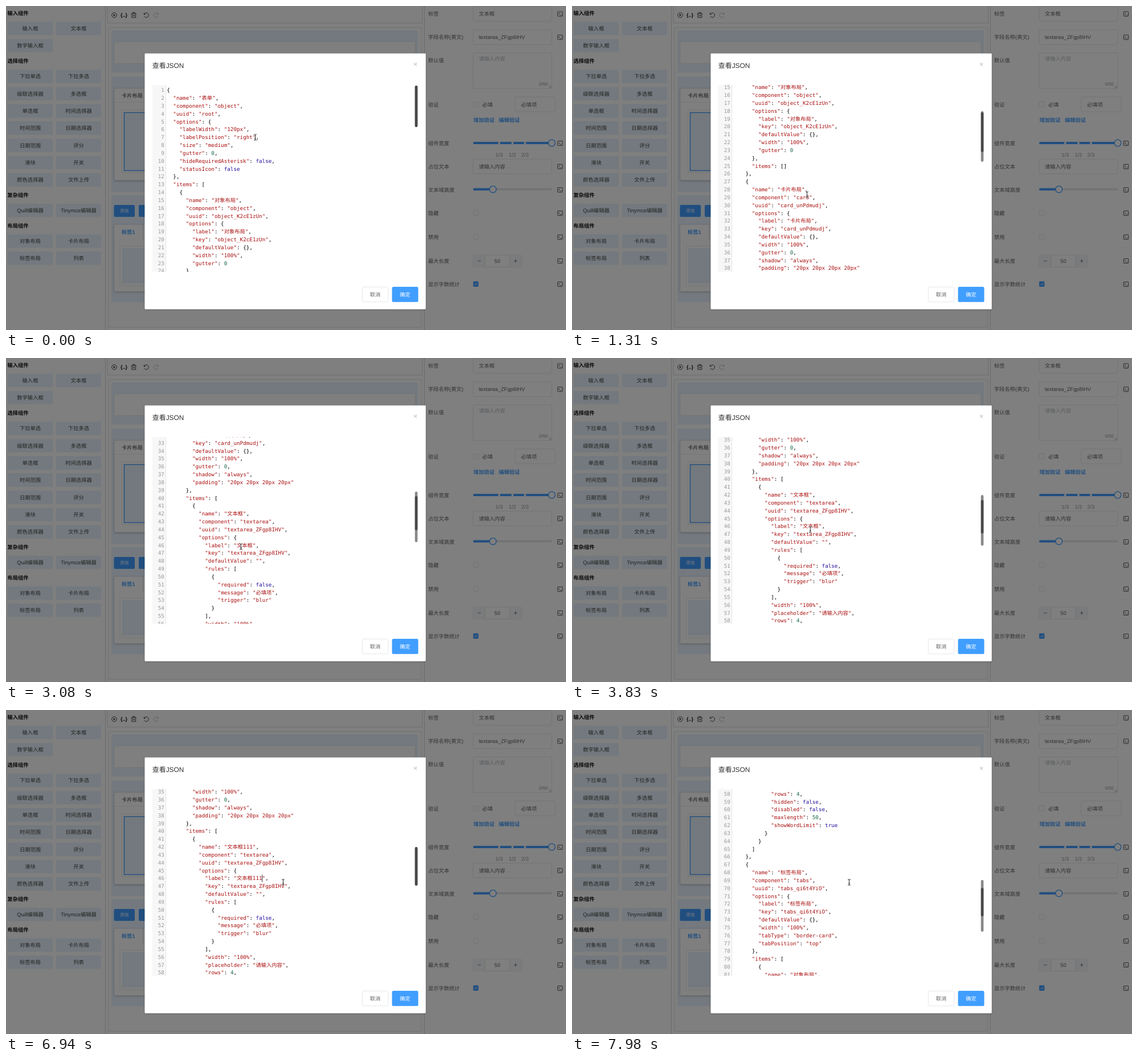
Animation of 983x570 px, one loop 8 s. Source, as an HTML page:

```html
<!DOCTYPE html>
<html lang="zh-CN">
<head>
<meta charset="utf-8">
<title>查看JSON</title>
<style>
  html, body { margin: 0; width: 100%; height: 100%; overflow: hidden; background: #fff; }
  svg { display: block; }
  text { font: 9.28px "Liberation Sans", "Noto Sans CJK SC", "Noto Sans CJK", sans-serif; text-rendering: geometricPrecision; white-space: pre; }
  .code text { font-family: "DejaVu Sans Mono", "Noto Sans CJK SC", "Noto Sans CJK", monospace; }
  .num { fill: #999; text-anchor: end; }
  .string { fill: #a11; } .number { fill: #164; } .atom { fill: #219; }
</style>
</head>
<body>
<svg id="stage" width="983" height="570" viewBox="0 0 983 570"></svg>
<script>
const BLUE = '#409eff', BORDER = '#dcdfe6', TEXT = '#606266', PALE = '#e8f3fd';
const SIZE = 9.28, CHAR = SIZE * 0.602, LINE = 13.83, CODE_X = 282.2, CODE_Y = 148;

// Drawing helpers; text is placed by its vertical centre.
const rect = (x, y, w, h, fill = '#fff', stroke = 'none', more = '') =>
  `<rect x="${x}" y="${y}" width="${w}" height="${h}" fill="${fill}" stroke="${stroke}" stroke-width=".7" ${more}/>`;
const path = (d, stroke, width = 1, more = '') =>
  `<path d="${d}" fill="none" stroke="${stroke}" stroke-width="${width}" ${more}/>`;
const circle = (x, y, r, fill, stroke = 'none', width = 1) =>
  `<circle cx="${x}" cy="${y}" r="${r}" fill="${fill}" stroke="${stroke}" stroke-width="${width}"/>`;
const label = (x, y, value, { fill = TEXT, size = SIZE, weight = 400, anchor = 'start' } = {}) =>
  `<text x="${x}" y="${y + size * 0.37}" fill="${fill}" text-anchor="${anchor}" style="font-size:${size}px;font-weight:${weight}">${value}</text>`;
const middle = { anchor: 'middle' };
const field = (x, y, w, h) => rect(x, y, w, h, '#fff', BORDER, 'rx="2.6"');

function sidebar() {
  const sections = [
    [12.5, '输入组件', '输入框 文本框 数字输入框'],
    [97, '选择组件', '下拉单选 下拉多选 级联选择器 多选框 单选框 时间选择器 时间范围 日期选择器 日期范围 评分 滑块 开关 颜色选择器 文件上传'],
    [332.5, '复杂组件', 'Quill编辑器 Tinymce编辑器'],
    [386.5, '布局组件', '对象布局 卡片布局 标签布局 列表'],
  ];
  return sections.map(([top, title, names]) =>
    label(2.5, top, title, { fill: '#111', weight: 600 }) +
    names.split(' ').map((name, i) => {
      const x = 3 + (i % 2) * 85, y = top + 27 + Math.floor(i / 2) * 30.3;
      return rect(x, y - 11.8, 79, 23.6, PALE, 'none', 'rx="1.5"') + label(x + 39.5, y, name, { ...middle, fill: '#444' });
    }).join('')).join('');
}

function toolbar() {
  const ink = '#333';
  return rect(178, -2, 552.5, 32, '#fff', '#ccc') +
    circle(190, 16, 4.3, 'none', ink, 0.9) + `<path d="M188.8 13.8l3.2 2.2-3.2 2.2z" fill="${ink}"/>` +
    label(207, 15.5, '{..}', { ...middle, fill: '#111', weight: 700, size: 9 }) +
    path('M219.8 13.3h9M222.5 13v-1.6h3.6V13M220.9 13.5v6.7h6.8v-6.7M223.2 15.3v3M225.4 15.3v3', ink, 0.9) +
    path('M242.3 12v2.8h2.8M242.6 14.5a4 4 0 1 1 .2 3.6', ink, 0.9) +
    path('M267 12v2.8h-2.8M266.7 14.5a4 4 0 1 0-.2 3.6', '#bbb', 0.9);
}

function canvasArea() {
  const dashed = 'stroke-dasharray="2 1.4"';
  return rect(180, 38, 549, 527, '#fff', '#d5dbe2') +
    rect(185, 43, 538, 74, PALE) + rect(190, 63, 528, 38, '#fff', '#cfd6dd', dashed) +
    rect(185, 124, 538, 203, PALE) +
    rect(190, 145, 528, 161.5, '#fff', '#d4d8df', 'rx="2.6" filter="url(#soft)"') +
    path('M190 169.5H718', '#e4e7ed', 0.7) + label(203, 157.5, '卡片布局', { fill: '#303133' }) +
    rect(203.5, 183, 500, 110, '#fff', '#ccc', dashed) + rect(207.5, 187.5, 490, 102, PALE, BLUE, 'style="stroke-width:1.4"') +
    rect(185, 333, 538, 188, PALE) +
    rect(189.5, 350, 36.5, 21, BLUE, 'none', 'rx="2"') + label(207.7, 360.5, '添加', { ...middle, fill: '#fff', size: 8, weight: 500 }) +
    rect(233, 350, 36.5, 21, BLUE, 'none', 'rx="2"') +
    rect(190, 385, 528, 117, '#fff', BORDER, 'filter="url(#soft)"') + rect(190, 385, 528, 26, '#f5f7fa', BORDER) +
    rect(190, 385, 50, 26.5, '#fff') + path('M240 385v26', BORDER, 0.7) +
    label(203, 398, '标签1', { fill: BLUE, weight: 600 }) +
    rect(200, 422, 508, 70, '#fff', '#ccc', dashed) + rect(204, 426, 500, 62, PALE);
}

function properties() {
  const rows = { 14: '标签', 55: '字段名称(英文)', 95.5: '默认值', 173.5: '验证', 241.5: '组件宽度', 282.5: '占位文本',
    323.5: '文本域高度', 364.5: '隐藏', 406.5: '禁用', 448.5: '最大长度', 489.5: '显示字数统计' };
  const terminal = y => rect(968.3, y - 4, 8.4, 8, 'none', '#444', 'rx=".8" style="stroke-width:.9"') +
    path(`M970 ${y - 2}l2 1.8-2 1.8M972.7 ${y + 2}h2.4`, '#444', 0.8);
  const box = y => rect(820.4, y - 4.3, 8.6, 8.6, '#fff', BORDER, 'rx="1.2"');
  const handle = (x, y) => circle(x, y, 5.9, '#fff', BLUE, 1.3);
  const link = { fill: BLUE, weight: 700 };
  return Object.entries(rows).map(([y, name]) => label(741, +y, name)).join('') +
    [14, 55, 241.5, 282.5, 323.5, 364.5, 406.5, 448.5, 489.5].map(terminal).join('') +
    field(820, 0.7, 138, 26.2) + label(830, 14, '文本框') +
    field(820, 41.7, 138, 26.2) + label(830, 55, 'textarea_ZFgp8IHV') +
    field(820, 82.5, 138, 63) + label(830, 93, '请输入内容', { fill: '#b4b8bf' }) +
    label(951, 137.5, '0/50', { fill: '#909399', size: 7.95, anchor: 'end' }) + path('M952.5 144.5l4.5-4.5M955 144.5l2-2', '#888', 0.7) +
    box(173) + label(836, 173.5, '必填', { weight: 500 }) + field(893.5, 160, 70.5, 26) + label(904, 173.5, '必填项') +
    label(820.5, 201, '增加验证', link) + label(865, 201, '编辑验证', link) +
    rect(820, 239, 138, 4, BLUE, 'none', 'rx="2"') +
    [['1/3', 865.7], ['1/2', 889], ['2/3', 911]].map(([name, x]) =>
      circle(x, 241, 2, '#fff') + label(x, 262, name, { ...middle, fill: '#909399' })).join('') +
    handle(958, 241) +
    field(820, 269.2, 138, 26.2) + label(830, 282.5, '请输入内容') +
    rect(820, 320.5, 138, 4, '#e4e7ed', 'none', 'rx="2"') + rect(820, 320.5, 35, 4, BLUE, 'none', 'rx="2"') + handle(854.7, 322.5) +
    box(364) + box(406.3) +
    field(820, 438, 85, 21) + rect(820.4, 438.4, 20.6, 20.2, '#f5f7fa') + rect(884, 438.4, 20.6, 20.2, '#f5f7fa') +
    path('M841 438v21M884 438v21', BORDER, 0.7) + path('M828 448.5h5.5M891.5 448.5h6M894.5 445.5v6', TEXT, 0.8) +
    label(862.5, 448.5, '50', middle) +
    rect(820.4, 484.8, 8.6, 8.6, BLUE, BLUE, 'rx="1.2"') + path('M822.4 489.2l1.8 1.8 3-3.8', '#fff', 1);
}

function modal() {
  return rect(243.5, 83.5, 493.3, 450, '#fff', 'none', 'rx="1.4" filter="url(#soft)"') +
    label(256.8, 104.3, '查看JSON', { fill: '#303133', size: 11.93 }) +
    path('M716.2 100l5 5M721.2 100l-5 5', '#909399', 0.8) +
    field(625.4, 494.4, 45.4, 26.2) + label(648, 507.6, '取消', { ...middle, weight: 500 }) +
    rect(677.6, 494, 46, 26.8, BLUE, 'none', 'rx="2.6"') + label(700.6, 507.6, '确定', { ...middle, fill: '#fff', weight: 500 });
}

// The JSON shown in the editor.
const base = key => ({ key, defaultValue: {}, width: '100%' });
const node = (name, component, uuid, options, items) => ({ name, component, uuid, options, items });
const objectNode = uuid => node('对象布局', 'object', uuid, { label: '对象布局', ...base(uuid), gutter: 0 }, []);
const textarea = node('文本框', 'textarea', 'textarea_ZFgp8IHV', {
  label: '文本框', key: 'textarea_ZFgp8IHV', defaultValue: '',
  rules: [{ required: false, message: '必填项', trigger: 'blur' }],
  width: '100%', placeholder: '请输入内容', rows: 4, hidden: false, disabled: false, maxlength: 50, showWordLimit: true,
});
const form = node('表单', 'object', 'root',
  { labelWidth: '120px', labelPosition: 'right', size: 'medium', gutter: 0, hideRequiredAsterisk: false, statusIcon: false }, [
    objectNode('object_K2cE1zUn'),
    node('卡片布局', 'card', 'card_unPdmudj',
      { label: '卡片布局', ...base('card_unPdmudj'), gutter: 0, shadow: 'always', padding: '20px 20px 20px 20px' }, [textarea]),
    node('标签布局', 'tabs', 'tabs_qi6t4YiO',
      { label: '标签布局', ...base('tabs_qi6t4YiO'), tabType: 'border-card', tabPosition: 'top' }, [objectNode('object_Rw3mA8dL')]),
  ]);
const lines = JSON.stringify(form, null, 2).split('\n');

const highlight = line => line.trim().replace(/("[^"]*")|(\d+)|(true|false)/g, (token, string, number) =>
  `<tspan class="${string ? 'string' : number ? 'number' : 'atom'}">${token}</tspan>`);
const lineY = i => CODE_Y + i * LINE;
const codeLines = lines.map((line, i) => {
  const x = CODE_X + line.search(/\S/) * CHAR, y = lineY(i) + 3.3;
  return `<text class="num" x="277.8" y="${y}">${i + 1}</text><text class="line" x="${x}" y="${y}">${highlight(line)}</text>`;
}).join('');

const ibeam = 'M-2.3-5.3Q0-5.3 0-3.8Q0-5.3 2.3-5.3M0-4V4M-2.3 5.3Q0 5.3 0 3.8Q0 5.3 2.3 5.3M-1.2 2h2.4';
const stage = document.getElementById('stage');
stage.innerHTML = `<defs>
  <filter id="soft" x="-5%" y="-5%" width="110%" height="115%"><feDropShadow dx="0" dy="1" stdDeviation="1.7" flood-opacity=".25"/></filter>
  <clipPath id="view"><rect x="257" y="139" width="467" height="328.7"/></clipPath></defs>
  ${rect(0, 0, 983, 570)}${path('M174.5 0V570M734.5 0V570', '#ccc', 0.8)}
  ${sidebar()}${toolbar()}${canvasArea()}${properties()}
  ${rect(0, 0, 983, 570, 'rgba(0,0,0,.5)')}${modal()}
  <g clip-path="url(#view)">${rect(257, 139, 23.6, 329, '#f7f7f7')}${path('M280.7 139V468', '#ddd', 0.7)}
    <g id="code" class="code">${codeLines}${path('', '#000', 0.8, 'id="caret"')}</g></g>
  <g id="bar">${rect(717.8, 140, 4.6, 72, '#888', 'none', 'id="trail" rx="2.3"')}${rect(717.8, 140, 4.6, 72, '#484848', 'none', 'id="thumb" rx="2.3"')}</g>
  <g id="mouse">${path(ibeam, '#fff', 2.2, 'opacity=".8"')}${path(ibeam, '#111', 0.9)}</g>`;

const [code, caret, bar, trail, thumb, mouse] =
  ['code', 'caret', 'bar', 'trail', 'thumb', 'mouse'].map(id => document.getElementById(id));
const lineNodes = code.querySelectorAll('.line');

// Tracks: each key is [position, ...values].
const scrollTrack = [[0, 0], [3, 0], [4, 25], [9, 198.6], [11, 240], [12, 240], [13, 265], [15, 335], [17, 383], [19, 383],
  [20, 412], [21, 441.1], [24, 468], [25, 468], [26, 474.2], [47, 474.2], [50, 630], [51, 630], [54, 788.8]];
const mouseTrack = [[0, 437.5, 231], [4, 412.5, 332], [25, 412.5, 332], [28, 430, 241], [29, 430, 241], [33, 473.5, 264],
  [36, 473.5, 264], [39, 436, 296], [41, 436, 296], [44, 483, 301], [45, 486.5, 303], [54, 486.5, 303]];
// By scroll offset: trail top, trail height, thumb top, thumb height.
const barTrack = [[0, 140, 73, 140, 73], [198.6, 185, 89, 187, 70], [335, 214, 89, 220, 65], [441, 235, 89, 243, 60], [789, 299, 91, 313, 50]];

function sample(track, at) {
  const next = track.findIndex(key => key[0] > at);
  if (next < 0) return track[track.length - 1].slice(1);
  const a = track[next - 1], b = track[next], p = (at - a[0]) / (b[0] - a[0]);
  return a.slice(1).map((v, i) => v + (b[i + 1] - v) * p);
}

const place = (el, y, height) => { el.setAttribute('y', y); el.setAttribute('height', height); };
const typed = (step, times) => times.filter(at => step >= at).length;

function typeInto(index, count) {
  lineNodes[index].innerHTML = highlight(lines[index].replace('文本框', '文本框' + '1'.repeat(count)));
}

function draw(time) {
  const step = Math.floor((time + 25) / 147.78);
  const [scroll] = sample(scrollTrack, step), [mx, my] = sample(mouseTrack, step);
  code.setAttribute('transform', `translate(0 ${-scroll})`);
  mouse.setAttribute('transform', `translate(${mx} ${my})`);

  const nameCount = typed(step, [33, 34, 35]), labelCount = typed(step, [44, 45, 47]);
  typeInto(41, nameCount);
  typeInto(45, labelCount);
  const onLabel = step >= 41, row = onLabel ? 45 : 41;
  const lead = lines[row].indexOf('文') + (onLabel ? labelCount : nameCount);
  const x = CODE_X + lead * CHAR + 3 * SIZE;
  caret.setAttribute('d', step < 29 ? '' : `M${x} ${lineY(row) - 6.6}v13.2`);

  const resting = step >= 41 && step < 48;
  const [trailY, trailH, thumbY, thumbH] = resting ? [241, 68, 241, 68] : sample(barTrack, scroll);
  place(trail, trailY, trailH);
  place(thumb, thumbY, thumbH);
  bar.setAttribute('opacity', step < 30 || step >= 41 ? 1 : 0);
}

const start = performance.now();
function tick() {
  draw((performance.now() - start) % 8000);
  requestAnimationFrame(tick);
}
tick();
</script>
</body>
</html>
```
